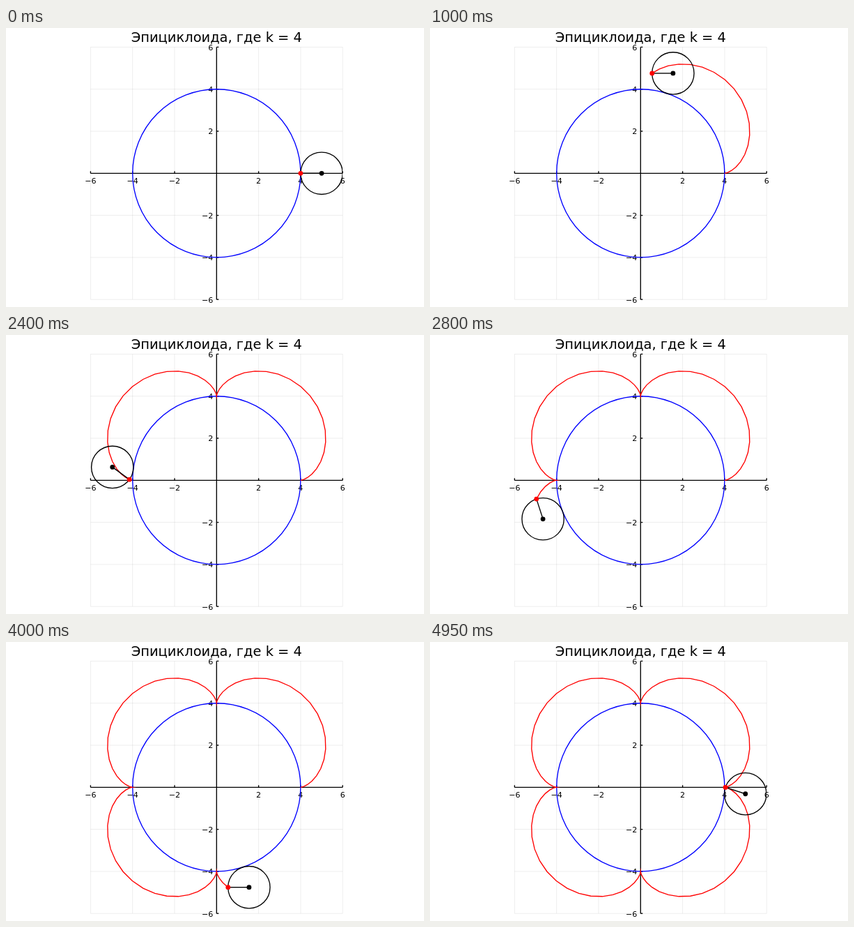
Write an HTML page with a canvas that moves like this. It is 600 by 400 pixels and loops after 5 s.

```html
<!DOCTYPE html>
<html lang="ru">
<head>
<meta charset="utf-8">
<style>
  html, body { margin: 0; width: 100%; height: 100%; overflow: hidden; background: #fff; }
  canvas { display: block; }
</style>
</head>
<body>
<canvas id="stage" width="600" height="400"></canvas>
<script>
const ctx = document.getElementById('stage').getContext('2d');
const TAU = 2 * Math.PI;
const STEPS = 100, STEP_MS = 50;
const UNIT = 30.15, LINE = 1.35, DOT = 3.4;
const RADIUS = 4, ROLLER = 1, ARM = RADIUS + ROLLER;
const TICKS = [-6, -4, -2, 0, 2, 4, 6];

const px = x => 302.3 + x * UNIT;
const py = y => 208.3 - y * UNIT;
const angleAt = step => TAU * step / STEPS;
const centerAt = a => [ARM * Math.cos(a), ARM * Math.sin(a)];

// Point on the rolling circle that traces the epicycloid
function tracerAt(a) {
  const [x, y] = centerAt(a);
  const spin = a * ARM / ROLLER;
  return [x - ROLLER * Math.cos(spin), y - ROLLER * Math.sin(spin)];
}

function polyline(points, color, width = LINE) {
  ctx.beginPath();
  points.forEach(([x, y]) => ctx.lineTo(px(x), py(y)));
  ctx.strokeStyle = color;
  ctx.lineWidth = width;
  ctx.stroke();
}

function circle([x, y], radius, color) {
  ctx.beginPath();
  ctx.arc(px(x), py(y), radius * UNIT, 0, TAU);
  ctx.strokeStyle = color;
  ctx.lineWidth = LINE;
  ctx.stroke();
}

function dot([x, y], color) {
  ctx.beginPath();
  ctx.arc(px(x), py(y), DOT, 0, TAU);
  ctx.fillStyle = color;
  ctx.fill();
}

function label(text, x, y, size, align) {
  ctx.font = `${size}px "DejaVu Sans", sans-serif`;
  ctx.textAlign = align;
  ctx.fillStyle = '#000';
  ctx.fillText(text, x, y);
}

function drawAxes() {
  for (const v of TICKS) {
    polyline([[v, -6], [v, 6]], 'rgba(0,0,0,0.1)', 0.7);
    polyline([[-6, v], [6, v]], 'rgba(0,0,0,0.1)', 0.7);
  }
  polyline([[-6, 0], [6, 0]], '#000');
  polyline([[0, -6], [0, 6]], '#000');
  for (const v of TICKS.filter(Boolean)) {
    polyline([[v, 0], [v, 0.1]], '#000');
    polyline([[0, v], [0.1, v]], '#000');
    const text = String(v).replace('-', '\u2212');
    label(text, px(v), 223, 11.1, 'center');
    label(text, 297.3, py(v) + 4.3, 11.1, 'right');
  }
  label('Эпициклоида, где k = 4', 302.3, 20, 19.44, 'center');
}

function draw(step) {
  ctx.fillStyle = '#fff';
  ctx.fillRect(0, 0, 600, 400);
  drawAxes();

  ctx.save();
  ctx.beginPath();
  ctx.rect(121, 27, 362, 362);
  ctx.clip();
  const center = centerAt(angleAt(step));
  const tracer = tracerAt(angleAt(step));
  const trail = Array.from({ length: step + 1 }, (_, i) => tracerAt(angleAt(i)));
  circle([0, 0], RADIUS, '#00f');
  polyline(trail, '#f00');
  circle(center, ROLLER, '#000');
  polyline([center, tracer], '#000');
  dot(center, '#000');
  dot(tracer, '#f00');
  ctx.restore();
}

function tick() {
  draw(Math.floor(performance.now() / STEP_MS) % STEPS);
  requestAnimationFrame(tick);
}
tick();
</script>
</body>
</html>
```
